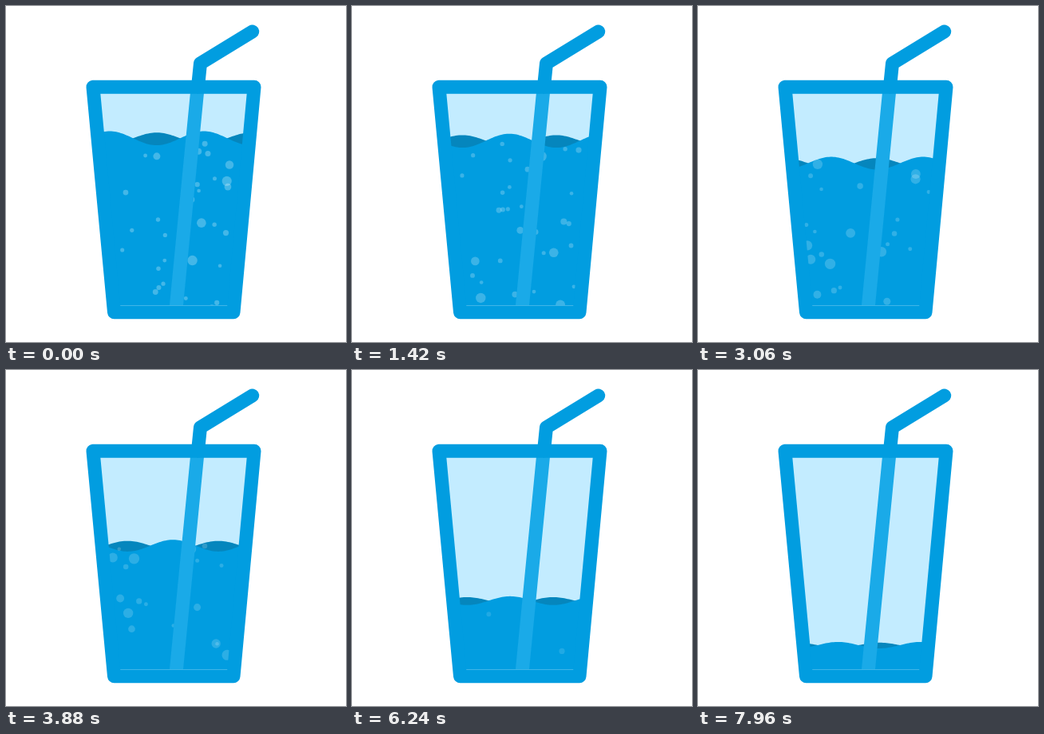
Write an HTML page with a canvas that moves like this. It is 426x420 px and loops after 8 s.

```html
<!DOCTYPE html>
<html lang="en">
<head>
<meta charset="utf-8">
<title>Glass of water</title>
<style>
html, body { margin: 0; width: 100%; height: 100%; overflow: hidden; background: #fff; }
canvas { display: block; }
</style>
</head>
<body>
<canvas width="426" height="420"></canvas>
<script>
const ctx = document.querySelector('canvas').getContext('2d');
const LOOP = 8000, TICK = 40, PAUSE = 100;
const BLUE = '#019de0', AIR = '#c3ecff', BACK_WATER = '#0586bd', STRAW = '#1aaae8';
const FLOOR = 374, CENTER = 210;

// Moments (ms) at which the motion stands still for PAUSE.
const HOLDS = [40, 340, 800, 1620, 1920, 3500, 3960, 5020, 5360, 5740, 5960, 6100, 7440, 7820];

let seed = 7;
const random = () => (seed = seed * 16807 % 2147483647) / 2147483647;

// Bubbles leave the floor at a steady rate that dies out near the end.
const COUNT = 80;
const bubbles = Array.from({ length: COUNT + 1 }, (_, i) => ({
  birth: -60 + 145 * i / COUNT + 80 * (i / COUNT) ** 30,
  spread: random() * 2 - 1,
  radius: 2.3 + 4.7 * random() ** 2.2
}));

function tickAt(time) {
  const paused = HOLDS.reduce((sum, hold) => sum + Math.min(Math.max(time - hold, 0), PAUSE), 0);
  return Math.floor((time - paused) / TICK + 1e-6);
}

function trace(points) {
  ctx.beginPath();
  for (const [x, y] of points) ctx.lineTo(x, y);
}

function fillShape(points, color) {
  trace(points);
  ctx.fillStyle = color;
  ctx.fill();
}

function strokeLine(points, color, closed = false) {
  trace(points);
  if (closed) ctx.closePath();
  ctx.lineWidth = 17;
  ctx.lineCap = ctx.lineJoin = 'round';
  ctx.strokeStyle = color;
  ctx.stroke();
}

function fillWave(level, amplitude, period, phase, color) {
  const points = [[100, 390]];
  for (let x = 100; x <= 320; x += 2) {
    const angle = 2 * Math.PI * ((x - CENTER) / period - phase);
    points.push([x, level - amplitude * Math.cos(angle)]);
  }
  points.push([320, 390]);
  fillShape(points, color);
}

function drawBubbles(tick, level) {
  ctx.fillStyle = `rgba(255,255,255,${0.26 - 0.0011 * tick})`;
  for (const { birth, spread, radius } of bubbles) {
    const rise = (2.4 + 0.36 * radius) * (tick - birth);
    const y = FLOOR + 4 - rise;
    if (y < level || rise < 0) continue;
    ctx.beginPath();
    ctx.arc(CENTER + spread * (66 + 0.094 * rise), y, radius, 0, 2 * Math.PI);
    ctx.fill();
  }
}

function draw(tick) {
  const drained = 1 - Math.cos(Math.PI * Math.max(tick - 12, 0) / 210);
  const level = 165.3 + 108.5 * drained;
  const amplitude = 8.8 - 2.9 * drained;
  const period = 118 - 9 * drained;
  const phase = 0.32 + 0.0204 * tick;

  ctx.fillStyle = '#fff';
  ctx.fillRect(0, 0, 426, 420);

  ctx.save();
  fillShape([[110, 102], [310, 102], [285, FLOOR], [136, FLOOR]], AIR);
  ctx.clip();
  fillWave(level, amplitude * 0.8, period, phase + 0.5, BACK_WATER);
  fillWave(level, amplitude, period, phase, BLUE);
  drawBubbles(tick, level);
  strokeLine([[240.3, 100], [212.5, 384]], STRAW);
  ctx.restore();

  strokeLine([[240.5, 101], [243.5, 71.7], [308.7, 32]], BLUE);
  strokeLine([[109, 101.2], [311, 101.2], [285, 382.7], [135.5, 382.7]], BLUE, true);
}

const start = performance.now();
function frame() {
  draw(tickAt((performance.now() - start) % LOOP));
  requestAnimationFrame(frame);
}
frame();
</script>
</body>
</html>
```
